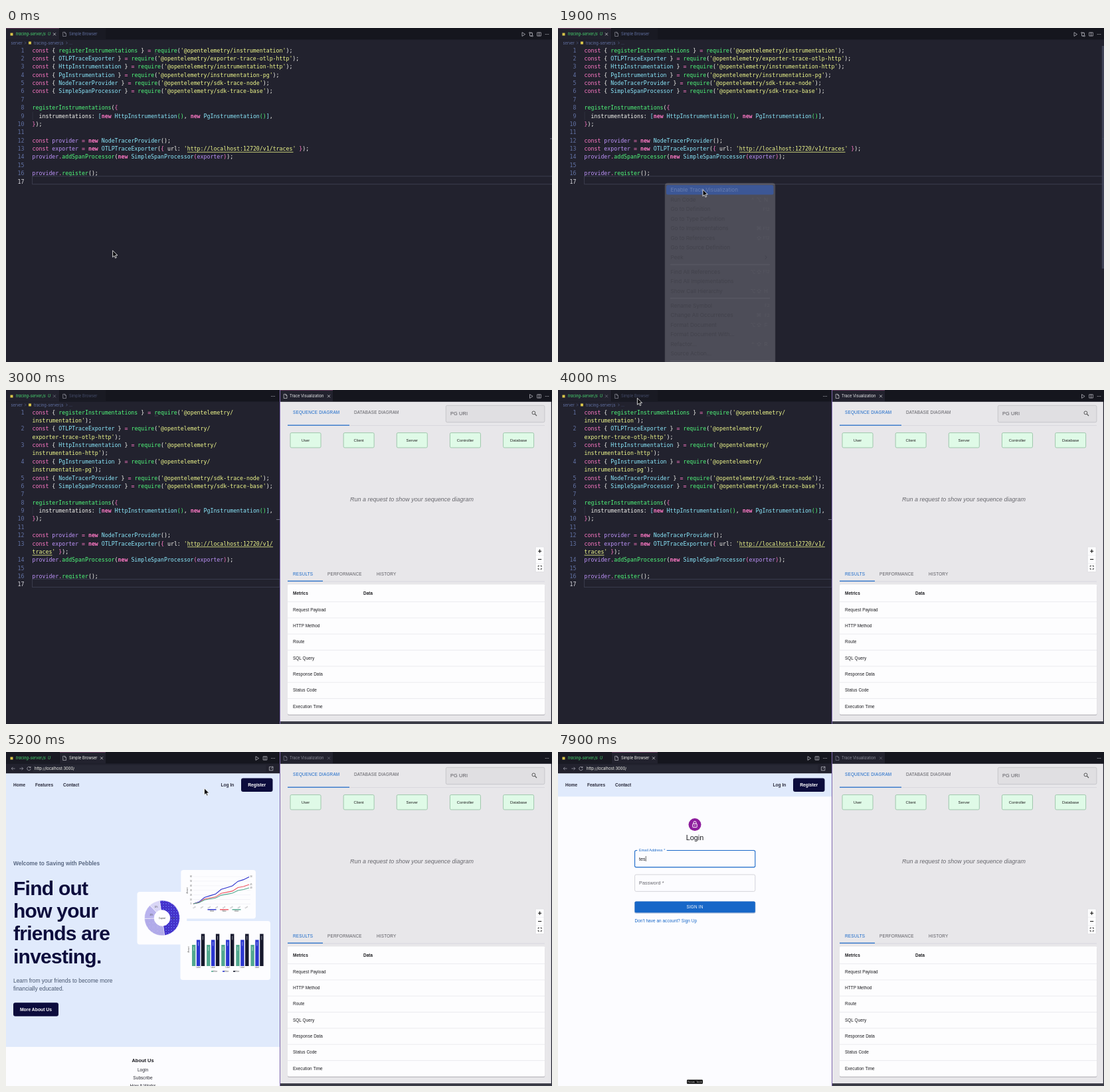
An HTML page that plays this animation: 822x504 px, repeating every 8 s.

```html
<!DOCTYPE html>
<html lang="en">
<head>
<meta charset="utf-8">
<title>Trace visualization demo</title>
<style>
html, body { margin: 0; width: 100%; height: 100%; overflow: hidden; background: #22222e; }
svg { display: block; width: 100vw; height: 100vh; }
text { white-space: pre; }
.ui { font-family: Inter, sans-serif; }
.web { font-family: "Liberation Sans", Arial, sans-serif; }
.code { font-family: "DejaVu Sans Mono", monospace; font-size: 8.24px; }
.key { font-family: Inter, "DejaVu Sans", sans-serif; }
.b { font-weight: 700; }
.i { font-style: italic; }
.mid { text-anchor: middle; }
.end { text-anchor: end; }
</style>
</head>
<body>
<svg id="stage" viewBox="0 0 822 504"></svg>
<script>
const LOOP = 8000;
const C = {
  bg: '#22222e', bar: '#15161e', tab: '#191a23', dim: '#6272a4', fg: '#f8f8f2', pink: '#ff79c6',
  green: '#50fa7b', cyan: '#8be9fd', purple: '#bd93f9', yellow: '#f1fa8c', line: '#3d3f50',
  navy: '#0c0c3c', sky: '#e0eafc', paper: '#fcfcff', blue: '#1767c8'
};

const rect = (x, y, w, h, fill, rx = 0, more = '') =>
  `<rect x="${x}" y="${y}" width="${w}" height="${h}" rx="${rx}" fill="${fill}" ${more}/>`;
const text = (x, y, s, size, fill, cls = 'ui', more = '') =>
  `<text x="${x}" y="${y}" font-size="${size}" fill="${fill}" class="${cls}" ${more}>${s}</text>`;
const path = (d, stroke, w = 0.7, fill = 'none', more = '') =>
  `<path d="${d}" stroke="${stroke}" stroke-width="${w}" fill="${fill}" ${more}/>`;
const circle = (x, y, r, fill, more = '') => `<circle cx="${x}" cy="${y}" r="${r}" fill="${fill}" ${more}/>`;
const group = (id, body, more = '') => `<g id="${id}" ${more}>${body}</g>`;
const spaced = s => `letter-spacing="${s}"`;

// ---------- icons ----------
const close = (x, y, c) => path(`M${x - 2} ${y - 2}l4 4m0-4l-4 4`, c);
const page = (x, y, c) => path(`M${x - 2.3} ${y - 3}h3l1.8 1.8v4.4h-4.8zM${x + .6} ${y - 3}v1.9h1.9`, c, 0.6);
const play = (x, c = '#c8c8d0') => path(`M${x - 2} 6.6l4.6 2.9l-4.6 2.9z`, c);
const split = (x, c = '#c8c8d0') => path(`M${x - 2.8} 6.8h5.6v5.2h-5.6zM${x} 6.8v5.2`, c);
const dots = (x, c = '#c8c8d0') => [-2.2, 0, 2.2].map(d => circle(x + d, 9.5, 0.6, c)).join('');
const compare = x => circle(x - 2, 7.3, 0.9, 'none', 'stroke="#c8c8d0" stroke-width=".7"') +
  circle(x + 2, 12, 0.9, 'none', 'stroke="#c8c8d0" stroke-width=".7"') +
  path(`M${x - 2} 8.3v3.7h2.6m-1-1l1 1l-1 1M${x + 2} 11v-3.7h-2.6m1-1l-1 1l1 1`, '#c8c8d0');
const glass = (x, y) => circle(x - .8, y - .8, 2.4, 'none', 'stroke="#555" stroke-width="1"') +
  path(`M${x + 1} ${y + 1}l2.8 2.8`, '#555', 1.1);
const fileMark = (x, y) => rect(x - 2, y - 2, 4, 4, '#d9c64a');

// ---------- editor ----------
const imp = (name, mod) => `const { ${name} } = require('@opentelemetry/${mod}');`;
const source = [
  imp('registerInstrumentations', '~instrumentation'),
  imp('OTLPTraceExporter', '~exporter-trace-otlp-http'),
  imp('HttpInstrumentation', '~instrumentation-http'),
  imp('PgInstrumentation', '~instrumentation-pg'),
  imp('NodeTracerProvider', 'sdk-trace-node'),
  imp('SimpleSpanProcessor', 'sdk-trace-base'),
  '', 'registerInstrumentations({',
  '  instrumentations: [new HttpInstrumentation(), new PgInstrumentation()],',
  '});', '',
  'const provider = new NodeTracerProvider();',
  "const exporter = new OTLPTraceExporter({ url: 'http://localhost:12720/v1/~traces' });",
  'provider.addSpanProcessor(new SimpleSpanProcessor(exporter));',
  '', 'provider.register();', ''
];
const brackets = [C.fg, C.pink, C.cyan, C.green];
const LEFT = 39.6, ROW = 12.375;

function tokenColor(tok) {
  if (tok[0] === "'") return C.yellow;
  if (/^(const|new|=|\.)$/.test(tok)) return C.pink;
  if (/^[A-Z]/.test(tok)) return C.cyan;
  if (/^(provider|exporter)$/.test(tok)) return C.purple;
  if (/^(registerInstrumentations|require|addSpanProcessor|register)$/.test(tok)) return C.green;
  return C.fg;
}

function code(wrap, right) {
  let out = '', row = 0, depth = 0;
  const base = r => 36.5 + r * ROW;
  source.forEach((line, i) => {
    const last = i === source.length - 1;
    if (last) out += rect(LEFT, base(row) - 10.8, right - LEFT + 1, 12, 'none', 0, `stroke="${C.line}" stroke-width=".9"`);
    if (i === 8) out += path(`M${LEFT + .5} ${base(row) - 9}v12`, '#3a3b4b', 0.6);
    out += text(27.5, base(row), i + 1, 8.24, last ? '#d8d8de' : C.dim, 'code end');
    const rows = [''];
    for (const tok of line.match(/'[^']*'|\w+|\s+|./g) || []) {
      let color = tokenColor(tok);
      if ('([{'.includes(tok)) color = brackets[depth++];
      if (')]}'.includes(tok)) color = brackets[--depth];
      const parts = wrap ? tok.split('~') : [tok.replace('~', '')];
      parts.forEach((p, n) => {
        if (n) rows.push('');
        rows[rows.length - 1] += `<tspan fill="${color}"${tok === 'new' ? ' font-weight="700"' : ''}>${p}</tspan>`;
      });
    }
    for (const r of rows) out += text(LEFT, base(row++), r, 8.24, C.fg, 'code');
  });
  out += [224.3, 226.2, 228.1].map(x => circle(x, 38.9, 0.45, '#b0b0b8')).join('');
  const links = wrap ? 'M273 236.8H402M39.6 249.2H69.5' : 'M273 187.3H432.5';
  return out + path(links, C.yellow, 0.8);
}

// state: 0 code focused, 1 code unfocused, 2 browser focused
function leftTabs(state, right) {
  const web = state === 2;
  const label = [C.dim, '#454d6b', C.fg][state];
  return rect(0, 0, right, 17.5, C.bar) + rect(0, 0, 80, 17.5, web ? C.tab : C.bg) +
    rect(81, 0, 69, 17.5, web ? C.bg : C.tab) +
    (state === 0 ? rect(0, 0, 80, 0.6, '#8a4a75') : web ? rect(81, 0, 69, 0.6, '#8a4a75') : '') +
    fileMark(8.5, 9.5) + text(15, 11.4, 'tracing-server.js', 5.75, '#4be374', 'ui i') +
    text(63, 11.4, 'U', 5.75, '#4be374', 'ui i') +
    (web ? '' : close(73, 9.3, state ? '#777988' : '#e6e6ea')) +
    page(88, 9.3, web ? '#d0d0d8' : '#a8a8b4') + text(95, 11.4, 'Simple Browser', 5.75, label) +
    (web ? close(144, 9.3, '#e6e6ea') : '');
}

const crumbs = text(7.5, 24.6, 'server', 5.75, C.dim) + path('M28.2 20.7l1.6 1.8l-1.6 1.8M90.6 20.7l1.6 1.8l-1.6 1.8', C.dim, 0.6) +
  fileMark(36, 22.5) + text(42, 24.6, 'tracing-server.js', 5.75, C.dim) + text(95, 24.6, '...', 5.75, C.dim);

const wideEditor = rect(0, 0, 822, 504, C.bg) + leftTabs(0, 822) + crumbs + code(false, 822) +
  play(779) + compare(790.5) + split(802.5) + dots(814.5) + rect(819, 166.6, 3, 0.9, '#77798a') +
  group('scroll', rect(818.8, 27, 3.2, 336, '#44475a', 0, 'opacity=".85"'));
const narrowEditor = rect(0, 0, 412, 504, C.bg) + leftTabs(1, 412) + crumbs + code(true, 411) +
  dots(402) + rect(407, 195, 5, 0.9, '#77798a');

// ---------- context menu ----------
const items = [
  ['Enable Trace Visualization'], ['Run Code', '^⌥', 'N'], ['Go to Definition', '', 'F12'], ['Go to Type Definition'],
  ['Go to Implementations', '⌘', 'F12'], ['Go to References', '⇧', 'F12'], ['Go to Source Definition'], ['Peek', '', '>'], null,
  ['Find All References', '⌥⇧', 'F12'], ['Find All Implementations'], ['Show Call Hierarchy', '⌥⇧', 'H'], null,
  ['Rename Symbol', '', 'F2'], ['Change All Occurrences', '⌘', 'F2'], ['Format Document', '⌥⇧', 'F'],
  ['Format Document With...'], ['Refactor...', '^⇧', 'R'], ['Source Action...'], null
];
const itemY = [];
function menu() {
  let y = 244.2, out = '';
  for (const item of items) {
    if (!item) {
      out += path(`M169 ${y - 3.6}H319`, '#b9b9bf', 0.6);
      y += 7.2;
      continue;
    }
    const [name, mods = '', key = ''] = item;
    itemY.push(y);
    out += text(169.5, y + 2.9, name, 8.2, '#1c1c20', 'ui', 'data-item');
    [...mods].reverse().forEach((m, n) => out += text(302.5 - n * 9, y + 2.9, m, 8, '#77777e', 'key mid'));
    if (key === '>') out += path(`M311.6 ${y - 2.6}l2.8 2.6l-2.8 2.6`, '#1c1c20', 1);
    else if (key.length > 1) out += text(318.3, y + 2.3, key, 5.9, '#77777e', 'ui end');
    else out += text(313, y + 2.9, key, 8, '#77777e', 'ui mid');
    y += 14.55;
  }
  return group('menuBase', rect(161, 234, 166, 290, '#e4e4e8', 4, 'stroke="#a0a0a8" stroke-width=".6"')) +
    group('menuPick', rect(163, 237, 161.5, 14.4, '#2a63dc', 2.5)) + group('menuText', out);
}

// ---------- trace panel ----------
const nodes = ['User', 'Client', 'Server', 'Controller', 'Database'];
const metrics = ['Request Payload', 'HTTP Method', 'Route', 'SQL Query', 'Response Data', 'Status Code', 'Execution Time'];
const webTab = (x, y, s, on) => text(x, y, s, 6.4, on ? C.blue : '#5c5c62', 'web', spaced(0.18));
const plain = (x, y, s, cls = 'web') => text(x, y, s, 6.4, '#1b1b1f', cls, spaced(0.07));

const panelBody = rect(413, 17.8, 407.8, 482.4, '#e8e7ea') +
  path('M424 53.6H811M424 289H811', '#cfced3', 0.6) +
  webTab(432, 36.3, 'SEQUENCE DIAGRAM', true) + webTab(524, 36.3, 'DATABASE DIAGRAM') +
  rect(424, 52.6, 93, 1.2, C.blue) +
  rect(662.3, 23.3, 148.6, 25.4, '#e0dfe2', 2, 'stroke="#bbbabf" stroke-width=".7"') +
  text(669, 38.3, 'PG URI', 7.4, '#55555b', 'web', spaced(0.12)) + glass(795.2, 35.2) +
  nodes.map((n, i) => {
    const x = 428 + i * 80.15;
    return rect(x, 64.6, 46, 22.4, '#dffae7', 1.8, 'stroke="#8fbd9d" stroke-width=".8"') +
      text(x + 23, 78, n, 5.9, '#222', 'web mid');
  }).join('') +
  text(611, 167.6, 'Run a request to show your sequence diagram', 8.97, '#68686e', 'web i mid') +
  rect(797.3, 236.8, 12.8, 37.8, '#fdfdfe', 1, 'stroke="#d2d2d6" stroke-width=".5"') +
  path('M797.5 249.3h12.4m-12.4 12.5h12.4', '#e0e0e4', 0.5) +
  path('M801 243.2h5.2m-2.6-2.6v5.2M801 255.5h5.2', '#111', 1.1) +
  path('M801.2 266.7v-1.4h1.6m1.8 0h1.6v1.4m0 2.2v1.4h-1.6m-1.8 0h-1.6v-1.4', '#111', 0.9) +
  webTab(432, 279.8, 'RESULTS', true) + webTab(484, 279.8, 'PERFORMANCE') + webTab(558, 279.8, 'HISTORY') +
  rect(424, 287.7, 53, 1.2, C.blue) +
  rect(424, 294.4, 387.4, 196.6, '#b9b8bd', 2) + rect(424, 293.4, 387.4, 196.4, '#fdfdfe', 2) +
  plain(432, 308.7, 'Metrics', 'web b') + plain(538, 308.7, 'Data', 'web b') +
  metrics.map((m, i) => path(`M424 ${319.6 + i * 24.33}h387.4`, '#e0e0e4', 0.6) + plain(432, 333.7 + i * 24.33, m)).join('');

const panelTab = (c, x) => page(420.5, 9.3, c) + text(427, 11.4, 'Trace Visualization', 5.75, c) + close(486, 9.3, x);
const panel = rect(412, 0, 410, 504, C.bg) + rect(413, 0, 409, 17.5, C.bar) + rect(413, 0, 79, 17.5, C.bg) +
  group('tabOn', panelTab('#eeeef0', '#e6e6ea') + rect(413, 0, 79, 0.6, '#8a4a75') + play(790.5) + split(802.5)) +
  group('tabOff', panelTab('#8a8b98', '#6c6d7a')) + dots(814.5) +
  group('panelBody', panelBody) + rect(413, 500.2, 409, 3.8, '#3c3d48') + rect(412, 0, 0.9, 504, '#8a70bd');

// ---------- simple browser ----------
const browser = rect(0, 0, 412, 504, C.bg) + leftTabs(2, 412) + play(378) + split(390) + dots(402) +
  path('M13.6 25H8.2m2.2-2.2l-2.2 2.2l2.2 2.2M20.4 25h5.4m-2.2-2.2l2.2 2.2l-2.2 2.2', '#a9aab6') +
  path('M36.7 23.4a2.7 2.7 0 1 0 .5 2.1M37 21.8v1.9h-1.9', '#c8c8d0') +
  rect(40.5, 19.6, 351, 10.8, '#272834') + text(43, 27.1, 'http://localhost:3000/', 5.85, C.fg) +
  path('M399 22.4h-2.6v5.4h5.4v-2.6m-2.6-3h2.8v2.8m0-2.8l-3.2 3.2', '#c8c8d0') +
  rect(0, 32.5, 412, 471.5, C.paper);

const bold = (x, y, s, size, fill, cls = '') => text(x, y, s, size, fill, 'web b ' + cls);
const nav = bold(11, 52, 'Home', 6.5, '#2a2b3c') + bold(44, 52, 'Features', 6.5, '#2a2b3c') +
  bold(86, 52, 'Contact', 6.5, '#2a2b3c') + text(323.5, 52, 'Log In', 6.6, '#2a2b3c', 'web b', 'id="logIn"') +
  rect(354, 39.6, 47.5, 20.4, C.navy, 3) + bold(377.7, 52.2, 'Register', 6.75, '#fff', 'mid');

function slice(a, b, fill) {
  const at = (r, g) => `${235 + r * Math.sin(g * Math.PI / 180)} ${250.5 - r * Math.cos(g * Math.PI / 180)}`;
  const big = b - a > 180 ? 1 : 0;
  return path(`M${at(26.5, a)}A26.5 26.5 0 ${big} 1 ${at(26.5, b)}L${at(12, b)}A12 12 0 ${big} 0 ${at(12, a)}Z`, '#fff', 0.5, fill);
}
function series(end, color, wobble) {
  let d = 'M282 229';
  for (let i = 1; i <= 10; i++) d += `L${282 + i * 8.4} ${229 + (end - 229) * i / 10 + (i < 10 ? wobble * Math.sin(i * 2.1) : 0)}`;
  return path(d, color, 1.1);
}
const label = (x, y, s) => text(x, y, s, 2.6, '#555', 'web mid');
const legend = (y, xs, colors, long) => xs.map((x, i) =>
  rect(x - (long ? 6.5 : 5), y - (long ? 0.7 : 0.8), long ? 13 : 3, long ? 1.4 : 1.6, colors[i]) +
  label(x + (long ? 0 : 1), y + (long ? 3.6 : 0.9), 'Value')).join('');

const barColors = ['#52a88f', '#2b36d0', '#16182c'];
let bars = '';
for (let g = 0; g < 5; g++) {
  [291, 283.5, 274.5].forEach((top, i) => {
    const x = 280 + g * 22.1 + i * 6.9;
    bars += rect(x, top, 5.4, 323 - top, barColors[i]) + rect(x + 2.1, top + 3, 1.1, 6, '#ffffff', 0, 'opacity=".45"');
  });
  bars += label(289.5 + g * 22.1, 326.2, 'Label');
}
const charts = rect(263.3, 178, 112.7, 73.6, '#fdfdff', 4) + rect(197.5, 211, 74.7, 79.5, '#fdfdff', 4) +
  rect(262.5, 255, 135.5, 89, '#fdfdff', 4) +
  slice(-8, 172, 'url(#dotted)') + slice(172, 268, 'url(#mesh)') + slice(268, 316, '#b9b3ee') + slice(316, 352, '#d9d6f6') +
  text(235, 251.6, 'Capital', 3.2, '#333', 'web mid') + label(252, 251.5, '50%') + label(219, 247, '20%') + label(226, 234.5, '10%') +
  Array.from({ length: 7 }, (_, i) => path(`M282 ${188 + i * 6.9}h86`, '#e4e4ee', 0.4) + label(278.5, 189 + i * 6.9, 60 - i * 10)).join('') +
  Array.from({ length: 8 }, (_, i) => text(284 + i * 11.2, 235, 'Day', 2.6, '#777', 'web mid', `transform="rotate(-40 ${284 + i * 11.2} 235)"`)).join('') +
  series(188.5, '#2b30cc', 1.6) + series(200, '#ef5561', 1.4) + series(205, '#52a88f', 1) +
  label(369, 189, '58') + label(369, 200.5, '45') + label(369, 205.5, '40') +
  text(274, 209, 'Amount', 2.6, '#555', 'web mid', 'transform="rotate(-90 274 209)"') +
  legend(237.8, [310, 328.5, 347], ['#2b30cc', '#ef5561', '#52a88f'], true) +
  bars + text(275.5, 298, 'Amount', 2.6, '#555', 'web mid', 'transform="rotate(-90 275.5 298)"') +
  legend(331, [314, 331, 347], barColors, false);

const home = rect(0, 32.5, 412, 412.5, C.sky) +
  bold(11, 170.9, 'Welcome to Saving with Pebbles', 8.4, '#5a6983') +
  ['Find out', 'how your', 'friends are', 'investing.'].map((s, i) =>
    text(11, 215.8 + i * 34.3, s, 30, C.navy, 'web b', spaced(-0.75))).join('') +
  text(11, 348.3, 'Learn from your friends to become more', 8.4, '#46556e', 'web') +
  text(11, 360.3, 'financially educated.', 8.4, '#46556e', 'web') +
  rect(11, 378.2, 68, 20.6, C.navy, 3) + bold(45, 390.9, 'More About Us', 6.8, '#fff', 'mid') + charts +
  bold(206, 468.1, 'About Us', 7.45, '#16161c', 'mid') +
  ['Login', 'Subscribe', 'How It Works'].map((s, i) => text(206, 482.3 + i * 12, s, 6.6, '#2c2c34', 'web mid')).join('');

const field = (y, id) => rect(115.6, y, 181.2, 25.4, 'none', 2.2, `id="${id}" stroke="#c3c3ca" stroke-width=".7"`);
const login = rect(0, 32.5, 412, 34.8, C.sky) + circle(206, 109.6, 9.5, '#8d1c9d') +
  rect(202.8, 108.3, 6.4, 5.4, 'none', 0.7, 'stroke="#fff" stroke-width="1"') +
  path('M204 108.2v-1.6a2 2 0 0 1 4 0v1.6', '#fff', 1) + circle(206, 111, 0.8, '#fff') +
  text(206, 133.4, 'Login', 10.9, '#1b1b20', 'web mid') +
  field(148.5, 'email') + rect(119.3, 147, 44.4, 3, C.paper, 0, 'id="notch"') +
  text(0, 0, 'Email Address *', 7.3, '#66666c', 'web', `id="emailLabel" ${spaced(0.07)}`) +
  text(122, 163.7, '', 7.3, '#1b1b20', 'web', 'id="typed"') + rect(0, 157, 0.6, 8, '#111', 0, 'id="caret"') +
  field(185, 'password') + text(122, 200.1, 'Password *', 7.3, '#66666c', 'web', spaced(0.07)) +
  rect(115, 225.4, 182.4, 18, '#9fb4d4', 2.2) + rect(115.6, 225.4, 181.2, 16.8, C.blue, 2) +
  text(206, 236.2, 'SIGN IN', 6.4, '#fff', 'web mid', spaced(0.18)) +
  text(115.5, 257.3, "Don't have an account? Sign Up", 6.4, C.blue, 'web', spaced(0.07)) +
  rect(194, 494.4, 24, 6.4, '#111', 1.2) +
  text(206, 499, 'Focus lock', 3.6, '#fff', 'code mid', 'style="font-size:3.6px"');

const pointer = group('arrow', path('M0 0V10L2.4 7.9L4 11.4L5.6 10.7L4.1 7.2H7.3Z', '#fff', 0.8, '#0b0b0e')) +
  group('hand', path('M-.9 0.6q.9-1.2 1.8 0V4.2q1.1-.9 1.8.1q1.1-.6 1.7.3q1.2-.3 1.4.8V8q-.2 1.4-1 3H-.4q-.8-1.6-3-4.2q0-1.3 1.3-.9l1.2 1.2z', '#fff', 0.9, '#0b0b0e') +
    path('M1 6.6v2.6m1.5-2.6v2.6m1.5-2.6v2.6', '#fff', 0.4)) +
  group('beam', path('M-1.6-4.5Q0-4.5 0-3Q0-4.5 1.6-4.5M0-3V3.5M-1.6 5Q0 5 0 3.5Q0 5 1.6 5', '#222', 0.7));

const svg = document.getElementById('stage');
svg.innerHTML = `<defs>
<pattern id="dotted" width="4" height="4" patternUnits="userSpaceOnUse">${rect(0, 0, 4, 4, '#3a2fd0')}${circle(1, 1, 0.5, '#fff')}${circle(3, 3, 0.4, '#ef5561')}</pattern>
<pattern id="mesh" width="2.4" height="2.4" patternUnits="userSpaceOnUse">${rect(0, 0, 2.4, 2.4, '#8f86e0')}${path('M0 0l2.4 2.4M2.4 0l-2.4 2.4', '#fff', 0.4)}</pattern>
</defs>` + group('wide', wideEditor) + group('menu', menu()) + group('narrow', narrowEditor) +
  group('browser', browser + group('home', home) + group('login', login) + group('nav', nav)) +
  group('panel', panel) + group('pointer', pointer);

const el = {};
svg.querySelectorAll('[id]').forEach(n => el[n.id] = n);
const itemText = svg.querySelectorAll('[data-item]');

// ---------- timeline ----------
const T = { menu: 600, pick: 1800, open: 2300, loaded: 2550, tab: 4250, page: 4450, login: 5850, focus: 6600 };
const keys = [7560, 7720, 7880];
const track = [
  [1000, 160.6, 335.8], [1600, 218, 243.8], [3000, 218, 243.8], [3700, 119.4, 12.2], [4500, 119.4, 12.2],
  [5050, 298.5, 54.8], [5200, 298.5, 54.8], [5520, 332.6, 50.8], [6300, 332.6, 50.8], [6560, 205, 161]
];
const clamp = v => Math.max(0, Math.min(1, v));
const ease = v => v * v * (3 - 2 * v);
const mix = (a, b, k) => a + (b - a) * k;
const show = (id, on) => el[id].setAttribute('display', on ? 'inline' : 'none');
const set = (id, name, v) => el[id].setAttribute(name, v);

function cursorAt(t) {
  const n = track.findIndex(k => k[0] > t);
  if (n === 0) return track[0].slice(1);
  if (n < 0) return track[track.length - 1].slice(1);
  const [a, b] = [track[n - 1], track[n]], k = ease((t - a[0]) / (b[0] - a[0]));
  return [mix(a[1], b[1], k), mix(a[2], b[2], k)];
}

function drawMenu(t, x, y) {
  const alpha = 1 - clamp((t - T.pick) / 130);
  show('menu', t >= T.menu && alpha > 0);
  set('menuBase', 'opacity', alpha);
  set('menuText', 'opacity', alpha);
  set('menuPick', 'opacity', Math.sqrt(alpha));
  const hit = x > 162 ? itemY.findIndex(v => Math.abs(v - y) < 7.3) : -1;
  show('menuPick', hit >= 0);
  if (hit >= 0) set('menuPick', 'transform', `translate(0 ${itemY[hit] - itemY[0]})`);
  itemText.forEach((n, i) => n.setAttribute('fill', i === hit ? '#fff' : '#1c1c20'));
}

function drawForm(t, x, y) {
  const k = clamp((t - T.focus) / 190), up = 1 - (1 - k) ** 3, on = t >= T.focus;
  const over = y > 148 && y < 174 && x < 297;
  set('email', 'stroke', on ? C.blue : over ? '#222' : '#c3c3ca');
  set('email', 'stroke-width', on ? 1.1 : 0.7);
  set('notch', 'opacity', up);
  set('emailLabel', 'transform', `translate(122 ${mix(163.6, 150, up)}) scale(${mix(1, 0.75, up)})`);
  set('emailLabel', 'fill', on ? C.blue : '#66666c');
  const n = keys.filter(v => t >= v).length;
  el.typed.textContent = 'tes'.slice(0, n);
  set('caret', 'x', 122.2 + [0, 2.1, 6.1, 9.7][n]);
  show('caret', on && (n > 0 || (t - T.focus) % 1060 < 530));
}

function draw(t) {
  const [x, y] = cursorAt(t);
  show('wide', t < T.open);
  show('scroll', t > 500);
  show('narrow', t >= T.open && t < T.tab);
  show('browser', t >= T.tab);
  show('home', t >= T.page && t < T.login);
  show('login', t >= T.login);
  show('nav', t >= T.page);
  show('panel', t >= T.open);
  show('panelBody', t >= T.loaded);
  show('tabOn', t < T.tab);
  show('tabOff', t >= T.tab);
  drawMenu(t, x, y);
  drawForm(t, x, y);
  const hand = t >= T.page && x > 322 && y < 56;
  const beam = t > T.login && y > 148 && y < 174 && x < 297;
  set('logIn', 'fill', hand ? '#05051c' : '#2a2b3c');
  show('arrow', !hand && !beam);
  show('hand', hand);
  show('beam', beam);
  // the text cursor is too dark to see over the code
  show('pointer', !(t >= T.open && t < T.tab && y > 18) && t < keys[0]);
  set('pointer', 'transform', `translate(${x} ${y})`);
}

const start = performance.now();
function tick(now) {
  draw(Math.max(0, now - start) % LOOP);
  requestAnimationFrame(tick);
}
draw(0);
requestAnimationFrame(tick);
</script>
</body>
</html>
```
